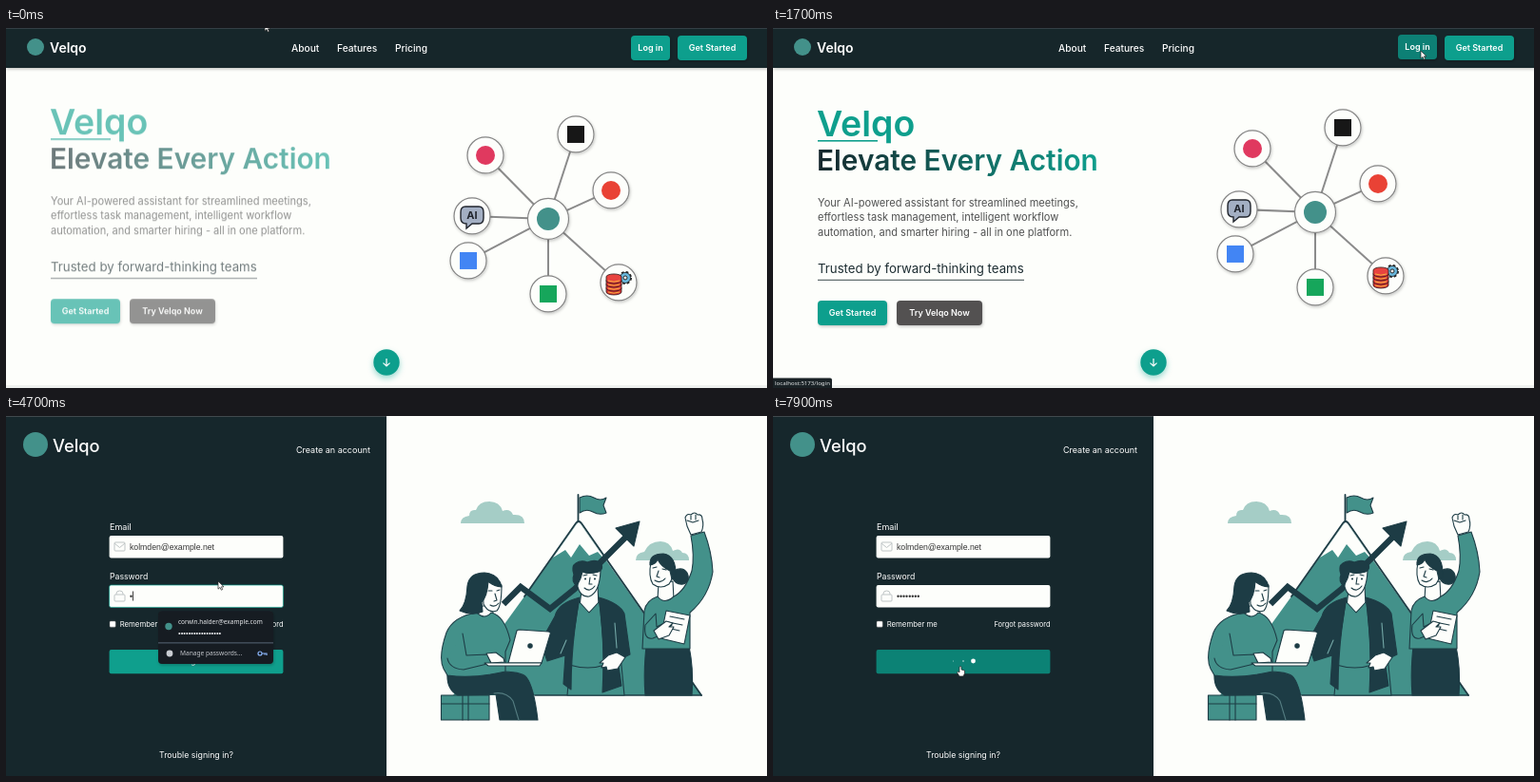
An HTML page that plays this animation: 800x379 px, repeating every 8000 ms.

```html
<!DOCTYPE html>
<html lang="en">
<head>
<meta charset="utf-8">
<title>Velqo</title>
<style>
html, body { margin: 0; width: 100%; height: 100%; overflow: hidden; background: #fdfefb; }
svg { display: block; width: 100%; height: 100%; }
text { font-family: Inter, "Open Sans", sans-serif; white-space: pre; }
.field { font-family: "Liberation Sans", Arial, sans-serif; }
.system { font-family: "Noto Sans", sans-serif; }
.art path, .art circle { stroke: #1d3c45; stroke-width: 1.1; stroke-linejoin: round; stroke-linecap: round; }
.art .bare { stroke: none; }
</style>
</head>
<body>
<svg id="stage" viewBox="0 0 800 379"></svg>
<script>
const BRAND = 'Velqo', LOOP = 8000, SWITCH = 1800;
const TEAL = '#0f9f8d', DARK = '#16272c', PAPER = '#fdfefb';
const GREEN = '#43918a', INK = '#1d3c45';
const EMAIL = 'kolmden@example.net', SAVED = 'corwin.halder@example.com';

const text = (x, y, size, str, fill, attrs = '') =>
  `<text x="${x}" y="${y}" font-size="${size}" fill="${fill}" ${attrs}>${str}</text>`;
const rect = (x, y, w, h, fill, r = 0, attrs = '') =>
  `<rect x="${x}" y="${y}" width="${w}" height="${h}" rx="${r}" fill="${fill}" ${attrs}/>`;
const circle = (x, y, r, fill, attrs = '') =>
  `<circle cx="${x}" cy="${y}" r="${r}" fill="${fill}" ${attrs}/>`;
const path = (d, fill = 'none', attrs = '') => `<path d="${d}" fill="${fill}" ${attrs}/>`;
const group = (attrs, ...parts) => `<g ${attrs}>${parts.join('')}</g>`;
const button = (id, x, y, w, h, fill, label) => group(`id="${id}"`,
  rect(x, y, w, h, fill, 4, 'filter="url(#soft)"'),
  text(x + w / 2, y + 16.3, 9, label, '#fff', 'font-weight="600" text-anchor="middle"'));

const links = [
  { label: 'About', x: 300, w: 29, enter: 330, leave: 640 },
  { label: 'Features', x: 348, w: 43, enter: 700, leave: 980 },
  { label: 'Pricing', x: 409, w: 34, enter: 1060, leave: 1280 }
];

function navbar() {
  return rect(0, 0, 800, 42, DARK, 0, 'filter="url(#soft)"') + rect(0, 0, 800, 1, '#343f45') +
    circle(31, 20, 9, GREEN) + text(46, 26, 14, BRAND, '#fff', 'font-weight="600"') +
    links.map((l, i) => text(l.x, 25, 10.2, l.label, '#fff', `id="link${i}" font-weight="500"`) +
      rect(l.x, 29, 0, 1.2, TEAL, 0, `id="line${i}"`)).join('') +
    button('login', 657, 8, 41, 26, TEAL, 'Log in') +
    button('start', 706, 8, 73, 26, TEAL, 'Get Started');
}

function hero() {
  const lines = ['Your AI-powered assistant for streamlined meetings,',
    'effortless task management, intelligent workflow',
    'automation, and smarter hiring - all in one platform.'];
  return group('id="hero"',
    text(46, 114, 37.5, BRAND, TEAL, 'font-weight="600"'), rect(47, 118, 63, 1.6, TEAL),
    text(46, 149.8, 29.8, 'Elevate Every Action', 'url(#headline)', 'font-weight="600"'),
    ...lines.map((s, i) => text(47, 187.5 + i * 15.6, 11.05, s, '#505151')),
    text(47, 258, 13.25, 'Trusted by forward-thinking teams', '#1d2d32'),
    rect(47, 264.8, 217, 1, '#3c4a4e'),
    button('heroStart', 47, 287, 73, 26, TEAL, 'Get Started'),
    button('heroTry', 130, 287, 90, 26, '#525151', `Try ${BRAND} Now`));
}

function toolIcons() {
  const gear = circle(7, -5, 5.5, '#69b8dd', 'stroke="#222" stroke-width="3" stroke-dasharray="2.5 1.8"') +
    circle(7, -5, 5.5, '#69b8dd', 'stroke="#222" stroke-width=".8"') + circle(7, -5, 2, '#fff', 'stroke="#222"');
  const layers = [8, 4, 0, -4].map((y, i) => path(
    `M-13 ${y - 2}a8 3 0 0 1 16 0v4a8 3 0 0 1 -16 0z`, i % 2 ? '#e8433f' : '#d93535',
    'stroke="#2a1a1a" stroke-width=".8"') + path(`M-11 ${y + 2}q6 2.5 12 0`, 'none', 'stroke="#f5b63e"')).join('');
  const bubble = path('M-7 -10H7Q12 -10 12 -4V2Q12 8 7 8H0L-6 13V8Q-12 8 -12 2V-4Q-12 -10 -7 -10Z',
    '#a3afc3', 'stroke="#20242c" stroke-width="1.4"') +
    text(0, 3, 11, 'AI', '#20242c', 'font-weight="700" text-anchor="middle"');
  return [
    [504, 134, circle(0, 0, 10, '#e0395f')],
    [599, 112, rect(-9, -9, 18, 18, '#171717')],
    [636, 171, circle(0, 0, 10, '#e94235')],
    [490, 198, bubble],
    [486, 245, rect(-9, -9, 18, 18, '#4285f4')],
    [570, 280, rect(-9, -9, 18, 18, '#16a65b')],
    [644, 268, gear + layers]
  ];
}

function network() {
  const nodes = toolIcons();
  const disc = (x, y, r, icon) => group(`transform="translate(${x} ${y})"`,
    circle(0, 0, r, PAPER, 'stroke="#858585" stroke-width="1.2" filter="url(#soft)"'), icon);
  return group('id="network"',
    ...nodes.map(([x, y]) => path(`M570 201L${x} ${y}`, 'none', 'stroke="#8b8b8b" stroke-width="2"')),
    ...nodes.map(([x, y, icon]) => disc(x, y, 19, icon)),
    disc(570, 201, 21.5, circle(0, 0, 12, GREEN)));
}

function landing() {
  return group('id="landing"', rect(0, 0, 800, 379, PAPER), rect(0, 376, 800, 3, '#eff1ef'),
    hero(), network(),
    circle(400, 352, 13.7, TEAL, 'filter="url(#glow)"'),
    path('M400 348V356M396.5 352.6L400 356L403.5 352.6', 'none', 'stroke="#fff" stroke-width="1.2"'),
    navbar());
}

function scenery() {
  return path('M478 113Q478 106 487 105Q487 98 494 99Q497 90 508 90Q519 90 522 100Q530 97 533 104Q545 103 545 113Z', '#a5cdc6', 'class="bare"') +
    path('M662 152Q662 144 671 143Q676 132 688 132Q698 132 701 142Q708 138 711 144Q718 144 718 152Z', '#a5cdc6', 'class="bare"') +
    path('M602 111L731 294H470Z', GREEN, 'class="bare"') +
    path('M602 111L575 149L588 141L594 149L603 135L613 147L622 143L632 154Z', PAPER, 'class="bare"') +
    path('M545 190L599 113Q602 109 605 113L731 294', 'none', 'style="stroke-width:1.8"') +
    path('M556 294H731', 'none', 'style="stroke-width:1.6"') +
    path('M603 86Q611 82 618 86T631 86L628 94L631 102Q624 105 617 101T603 102Z', GREEN) +
    path('M601.5 83V111', 'none', 'style="stroke-width:1.8"') +
    path('M523 198L541 180L572 203L598 182L626 153L655 124', 'none', 'style="stroke-width:6.4;stroke-linejoin:miter;stroke-linecap:butt"') +
    path('M666 111L641 118L660 137Z', INK);
}

function raisedArmWoman() {
  return path('M702 163Q711 158 716 165Q720 174 712 177Q704 178 701 171Z', INK) +
    path('M686 176L685 193Q693 201 702 193L701 174Z', PAPER) +
    path('M673 243Q670 270 672 294H721Q723 265 718 243Z', INK) +
    path('M685 190Q673 194 671 205L669 245H719V207Q739 190 743 164Q742 143 734 122L720 126Q724 147 721 163Q714 184 702 190Q692 199 685 190Z', GREEN) +
    path('M720 125L716 116L714 107Q716 102 720 104Q724 100 727 104Q732 103 732 109Q734 115 731 122Z', PAPER) +
    path('M716 110L722 112M720 105V109M725 104V109M722 112L728 110') +
    path('M678 154Q675 169 680 177Q688 183 697 177Q703 169 702 155Q690 145 678 154Z', PAPER) +
    path('M677 157Q676 145 691 145Q705 147 704 169L700 172L698 163Q689 159 685 151Q683 156 677 157Z', INK) +
    path('M680 160L684 159M690 161L694 162M686 163L684 169L687 170M682 173Q688 177 693 171') +
    path('M694 205L719 210L713 240L688 234Z', PAPER) +
    path('M698 211L713 214M696 217L711 220M695 223L708 226') +
    path('M672 220Q670 236 680 234L690 230L700 220L694 217L684 222L683 208Z', GREEN) +
    path('M681 226L694 216L701 218L697 222L702 222L697 231L686 235Z', PAPER);
}

function man() {
  return path('M594 250L590 294H650L645 242Z', GREEN) +
    path('M605 184L603 200L613 207L623 198L622 180Z', PAPER) +
    path('M602 195L592 262Q612 268 630 262L624 195L613 207Z', GREEN) +
    path('M603 191Q580 197 577 211L562 238L569 258L588 252L586 282L594 288Q594 240 603 191Z', INK) +
    path('M623 191Q645 197 650 208L656 251L644 257L641 242L647 284L627 291Q630 236 623 191Z', INK) +
    path('M642 249L633 252L624 260L628 260L626 265L631 264L632 268L643 266L651 254Z', PAPER) +
    path('M589 236L583 250M640 218L642 244', 'none', 'style="stroke:#74a8a7"') +
    path('M601 163V180Q604 191 613 190Q624 186 625 163Z', PAPER) +
    path('M600 179Q594 174 597 167Q594 158 599 155Q605 151 611 154Q621 150 626 156Q628 162 623 164Q612 167 606 164L604 171Z', INK) +
    path('M607 168L611 167M617 167L621 168M614 170L613 177L616 177M608 181Q614 186 619 179') +
    circle(609, 171.5, .5, INK) + circle(619, 171.5, .5, INK);
}

function laptopWoman() {
  return path('M457.5 294H508V320H457.5Z', GREEN) + path('M457.5 303H508M480 294V320M486 294V320') +
    path('M464 271Q463 288 475 294L515 293L519 320H559Q555 285 547 275Q541 268 510 269Z', INK) +
    path('M513 292Q526 290 533 300L539 320', 'none', 'style="stroke:#547c80"') +
    path('M497 201L495 210Q503 217 512 208L511 198Z', PAPER) +
    path('M495 207Q470 211 463 228Q454 254 460 266L464 273Q491 277 525 269L525 248L530 236Q524 210 510 207Q503 215 495 207Z', GREEN) +
    path('M501 178L502 198Q507 208 516 205Q521 200 521 178L511 172Z', PAPER) +
    path('M485 179Q487 165 503 165Q518 166 521 180Q512 179 507 174Q506 190 500 196L501 206Q490 211 477 205Q484 198 485 179Z', INK) +
    path('M507 184L511 184M516 184L519 183M514 187L516 194L513 195M509 199Q514 202 518 197') +
    path('M480 229L484 252L506 251L510 260L481 267Q466 266 464 255', GREEN) +
    path('M505 250L515 249L523 255L524 259L510 260Z', PAPER) +
    path('M537 226Q538 225 540 225L570 227Q573 227 572 230L563 260H528Z', PAPER) +
    path('M503 260H563L561 263H507Z', PAPER) +
    circle(551, 242, 2.2, INK);
}

const dropdown = (id, y) => group(`id="${id}" transform="translate(160 ${y})"`,
  rect(0, 0, 121, 55.5, '#191b20', 4, 'filter="url(#soft)"'),
  circle(11, 16, 3.7, GREEN),
  text(21, 13, 6.5, SAVED, '#e8eaed', 'class="system" font-weight="500"'),
  text(21, 25, 7.6, '•'.repeat(17), '#e8eaed', 'class="field"'),
  rect(0, 33, 121, .8, '#68798a'),
  circle(12, 44.5, 3.4, '#c9cdd2'),
  text(23, 46.8, 6.6, 'Manage passwords...', '#c3c6cb', 'class="system"'),
  circle(107, 44.5, 2, 'none', 'stroke="#8ab4f8" stroke-width="1.2"'),
  path('M109 44.5H114V46.5M112 44.5V46', 'none', 'stroke="#8ab4f8" stroke-width="1.2"'));

const input = (id, y, icon) =>
  rect(108.6, y, 182.8, 23.4, PAPER, 2, `id="${id}Box" stroke-width=".7"`) +
  path(icon, 'none', 'stroke="#bfc5c6" stroke-width="1"') +
  text(130, y + 14.7, 8.7, '', '#333', `id="${id}Text" class="field"`);

function signIn() {
  return group('id="signIn"', rect(0, 0, 800, 379, PAPER), rect(0, 0, 400, 379, DARK),
    rect(0, 0, 400, 1, '#41494d'),
    circle(31, 30, 13, GREEN), text(49, 37.5, 18.3, BRAND, '#fff', 'font-weight="500"'),
    text(383, 38.5, 9, 'Create an account', '#fff', 'text-anchor="end"'),
    text(109, 119.5, 9, 'Email', '#fff'), text(109, 171.5, 8.7, 'Password', '#fff'),
    input('email', 126, 'M115 133H124Q125 133 125 134V141Q125 142 124 142H115Q114 142 114 141V134Q114 133 115 133ZM114 134L119.5 138.5L125 134'),
    input('pass', 178, 'M114 189Q114 188 115 188H124Q125 188 125 189V194Q125 195 124 195H115Q114 195 114 194ZM116 188V187Q116 184 119.5 184T123 187V188'),
    rect(0, 0, .8, 10, '#111', 0, 'id="caret"'),
    rect(109, 216, 6.2, 6.2, '#fff', 1, 'stroke="#777" stroke-width=".5"'),
    text(119.7, 222, 7.75, 'Remember me', '#fff'),
    text(291.5, 222, 7.45, 'Forgot password', '#fff', 'text-anchor="end"'),
    rect(108.6, 246, 182.8, 25.2, TEAL, 2, 'id="submit"'),
    text(200, 261.2, 8, 'Sign in', '#fff', 'id="submitLabel" font-weight="500" text-anchor="middle"'),
    group('id="dots"', ...[189.5, 200, 210.5].map(x => circle(x, 258, 0, '#fff'))),
    text(200, 360, 8.75, 'Trouble signing in?', '#fff', 'text-anchor="middle"'),
    dropdown('emailMenu', 153), dropdown('passMenu', 205.5),
    group('class="art"', scenery(), raisedArmWoman(), man(), laptopWoman()));
}

const pointers = group('id="pointer"',
  path('M0 0V8.2L2 6.4L3.3 9.2L4.7 8.6L3.4 5.8H6Z', '#fff', 'id="arrow" stroke="#222" stroke-width=".7"'),
  path('M-1.6 -4H1.6M0 -4V4M-1.6 4H1.6', 'none', 'id="beam" stroke="#333" stroke-width=".9"'),
  path('M-1 0Q0 -1 1 0V3L4.5 4V7L3 10H-1L-3.5 6L-2.5 5L-1 6Z', '#fff', 'id="hand" stroke="#222" stroke-width=".7"'));

const stage = document.getElementById('stage');
stage.innerHTML = `<defs>
  <linearGradient id="headline" gradientUnits="userSpaceOnUse" x1="47" y1="0" x2="342" y2="0">
    <stop stop-color="${DARK}"/><stop offset="1" stop-color="${TEAL}"/></linearGradient>
  <filter id="soft" x="-20%" y="-20%" width="140%" height="160%">
    <feDropShadow dx=".8" dy="1.5" stdDeviation="1.5" flood-opacity=".22"/></filter>
  <filter id="glow" x="-50%" y="-50%" width="200%" height="200%">
    <feDropShadow dx="0" dy="3" stdDeviation="3" flood-color="${TEAL}" flood-opacity=".4"/></filter>
</defs>` + landing() + signIn() +
  group('id="status"', rect(-2, 368.5, 64, 12, '#1a2226', 2),
    text(2, 376, 6.1, 'localhost:5173/login', '#e4e7e8', 'class="system"')) + pointers;

const el = {};
stage.querySelectorAll('[id]').forEach(node => el[node.id] = node);
const set = (id, attrs) => { for (const k in attrs) el[id].setAttribute(k, attrs[k]); };
const show = (id, on) => set(id, { visibility: on ? 'visible' : 'hidden' });
const clamp = v => Math.min(1, Math.max(0, v));
const between = (t, a, b) => t >= a && t < b;
const pulse = (t, a, b, fade = 160) => clamp((t - a) / fade) * (1 - clamp((t - b) / fade));
const blend = (a, b, k) => `rgb(${a.map((v, i) => Math.round(v + (b[i] - v) * k))})`;

const route = [
  [0, 272, -5], [400, 312, 21], [600, 332, 24], [900, 372, 24], [1180, 426, 23],
  [1600, 681, 24], [1850, 681, 24], [2650, 183, 141], [4050, 183, 141],
  [4350, 215, 188], [4420, 215, 188], [4620, 223, 174], [6400, 223, 174],
  [7100, 197, 264], [LOOP, 197, 264]
];
function pointerAt(t) {
  const i = route.findIndex(p => p[0] > t);
  const [t0, x0, y0] = route[i - 1], [t1, x1, y1] = route[i];
  const u = (t - t0) / (t1 - t0), k = u * u * (3 - 2 * u);
  return [x0 + (x1 - x0) * k, y0 + (y1 - y0) * k];
}

function drawLanding(t) {
  const enter = 1 - (1 - clamp(t / 350)) ** 2;
  set('hero', { opacity: .62 + .38 * enter, transform: `translate(0 ${-1.8 * (1 - enter)})` });
  const lift = 3.75 * (1 - Math.cos((t + 300) / 4400 * 2 * Math.PI));
  set('network', { transform: `translate(0 ${.3 - lift})` });
  links.forEach((l, i) => {
    const k = pulse(t, l.enter, l.leave);
    set('link' + i, { fill: blend([255, 255, 255], [38, 154, 138], k) });
    set('line' + i, { width: l.w * k });
  });
  const hover = clamp((t - 1530) / 150);
  set('login', { transform: `translate(0 ${-hover})` });
  el.login.firstChild.setAttribute('fill', blend([15, 159, 141], [13, 128, 117], hover));
}

function drawField(id, value, placeholder, focused) {
  el[id + 'Text'].textContent = value || placeholder;
  set(id + 'Text', { fill: value ? '#333' : '#b4b8b8' });
  set(id + 'Box', { stroke: focused ? TEAL : 'none' });
}

function drawSignIn(t, x, y) {
  const typed = Math.round(clamp((t - 3200) / 900) * EMAIL.length);
  const keys = Math.min(8, Math.max(0, Math.floor((t - 4650) / 180) + 1));
  const onEmail = between(t, 2750, 4400), onPass = between(t, 4400, 7250);
  drawField('email', EMAIL.slice(0, typed), 'Name@example.com', onEmail);
  drawField('pass', '•'.repeat(keys), BRAND + 'Pass@123', onPass);
  show('emailMenu', between(t, 2800, 3250));
  show('passMenu', between(t, 4450, 4830));

  const active = onPass ? 'pass' : 'email', filled = onPass ? keys : typed;
  const width = filled ? el[active + 'Text'].getComputedTextLength() : 0;
  set('caret', { x: 130 + width, y: onPass ? 184.5 : 132.5 });
  show('caret', filled && (onEmail || onPass));

  const hover = clamp((t - 6950) / 150), loading = t >= 7300;
  set('submit', { fill: blend([15, 159, 141], [12, 130, 117], hover) });
  show('submitLabel', !loading);
  [...el.dots.children].forEach((dot, i) => {
    const wave = .5 + .5 * Math.cos((t - 7900) / 1000 * 2 * Math.PI + (2 - i) * 2);
    dot.setAttribute('r', loading ? 2.4 * wave : 0);
  });
  const inside = top => between(x, 109, 291) && between(y, top, top + 24);
  return inside(246) ? 'hand' : inside(126) || inside(178) ? 'beam' : 'arrow';
}

function draw(t) {
  const [x, y] = pointerAt(t), home = t < SWITCH;
  set('landing', { display: home ? 'inline' : 'none' });
  set('signIn', { display: home ? 'none' : 'inline' });
  if (home) drawLanding(t);
  const kind = home ? 'arrow' : drawSignIn(t, x, y);
  ['arrow', 'beam', 'hand'].forEach(name => show(name, name === kind));
  set('pointer', { transform: `translate(${x} ${y})` });
  show('status', between(t, 1650, 2050));
}

function tick() {
  draw(performance.now() % LOOP);
  requestAnimationFrame(tick);
}
tick();
</script>
</body>
</html>
```
